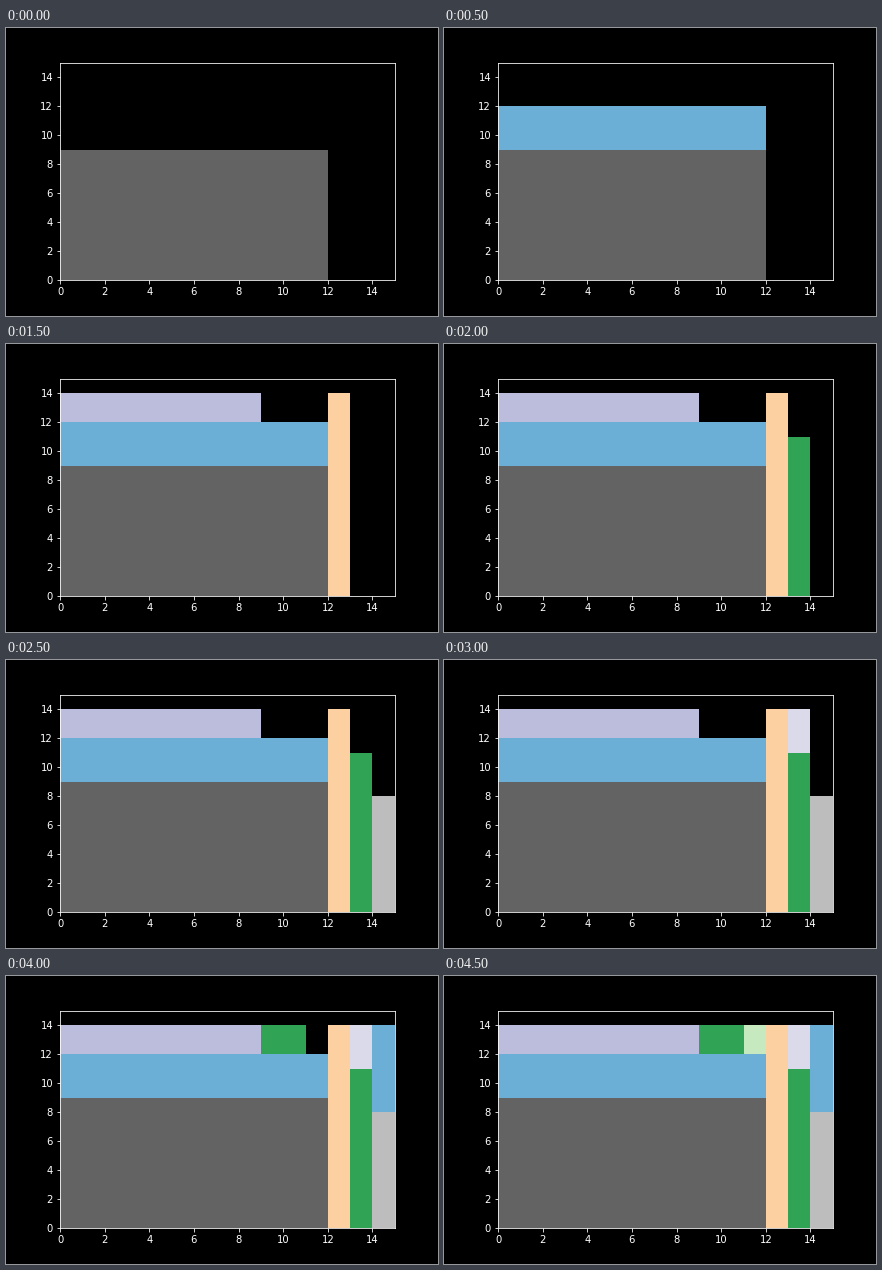
Animation, 432 px wide and 288 px high, one loop 5000 ms. Source, as a matplotlib script:

```python
import matplotlib.pyplot as plt
from matplotlib.animation import FuncAnimation
from matplotlib.patches import Rectangle

plt.style.use("dark_background")
plt.rcParams.update({"font.family": "DejaVu Sans", "font.size": 10})

SIZE = 15
STEP_MS = 500

# x, y, width, height, colour, in packing order
BLOCKS = [
    (0, 0, 12, 9, "#636363"),
    (0, 9, 12, 3, "#6baed6"),
    (0, 12, 9, 2, "#bcbddc"),
    (12, 0, 1, 14, "#fdd0a2"),
    (13, 0, 1, 11, "#31a354"),
    (14, 0, 1, 8, "#bdbdbd"),
    (13, 11, 1, 3, "#dadaeb"),
    (14, 8, 1, 6, "#6baed6"),
    (9, 12, 2, 2, "#31a354"),
    (11, 12, 1, 2, "#c7e9c0"),
]

fig, ax = plt.subplots(figsize=(6, 4), dpi=72)
fig.subplots_adjust(left=0.125, right=0.9, bottom=0.125, top=0.88)
ax.set_xlim(0, SIZE)
ax.set_ylim(0, SIZE)
ax.set_xticks(range(0, SIZE, 2))
ax.set_yticks(range(0, SIZE, 2))

rects = [
    ax.add_patch(Rectangle((x, y), w, h, facecolor=color, linewidth=0))
    for x, y, w, h, color in BLOCKS
]


def update(step):
    for i, rect in enumerate(rects):
        rect.set_visible(i <= step)
    return rects


anim = FuncAnimation(fig, update, frames=len(BLOCKS), interval=STEP_MS,
                     init_func=lambda: update(0), repeat=True, repeat_delay=0)
plt.show()
```
